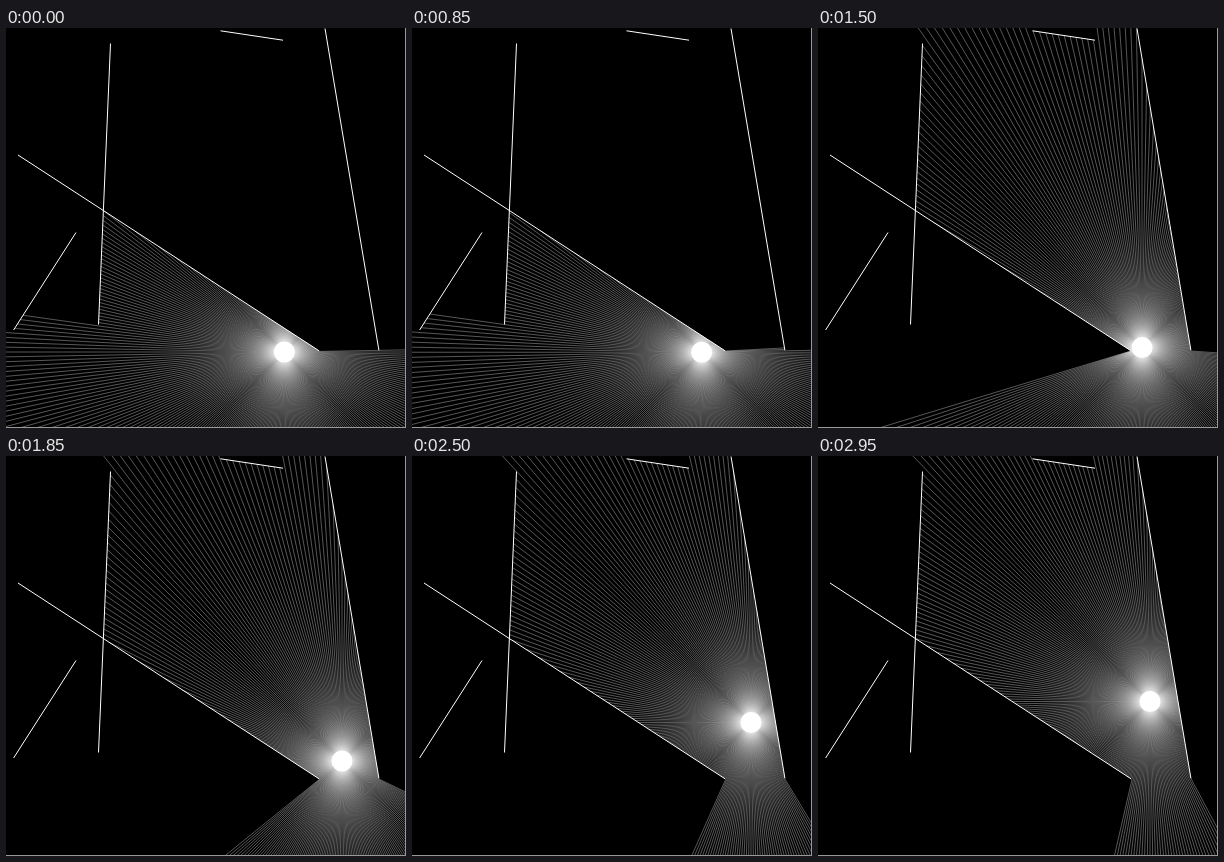
Animation, 400 px wide and 400 px high, one loop 3 s. Source, as an HTML page with a canvas:

```html
<!DOCTYPE html>
<html lang="en">
<head>
<meta charset="utf-8">
<title>Ray casting</title>
<style>
html, body { margin: 0; width: 100%; height: 100%; overflow: hidden; background: #000; }
canvas { display: block; width: 400px; height: 400px; }
</style>
</head>
<body>
<canvas id="stage" width="400" height="400"></canvas>
<script>
const SIZE = 400, LOOP = 3000;
const ctx = document.getElementById('stage').getContext('2d');

// x1, y1, x2, y2
const walls = [
  [12, 127, 313.2, 322.9],
  [104.5, 15.5, 92.5, 296.5],
  [70, 204.5, 7.6, 302],
  [214.5, 2.8, 277, 12.2],
  [319, 0.5, 372.9, 322.3]
];

// Key points of the light's path: step, x, y
const path = [
  [0, 278.3, 324], [7, 300, 323.8], [11, 324, 319.6],
  [15, 336, 305], [22, 339, 266.5], [27, 332, 245.5]
];

// The light rests, then steps about eleven times a second on a 50 ms clock
function stepAt(time) {
  if (time < 450) return 0;
  const clock = Math.floor(time / 50) * 50;
  return Math.max(1, Math.ceil((clock - 442.5) / 91.6) - 1);
}

function slope(i, axis) {
  const a = path[Math.max(i - 1, 0)];
  const b = path[Math.min(i + 1, path.length - 1)];
  return (b[axis] - a[axis]) / (b[0] - a[0]);
}

// Cubic Hermite curve through the key points
function along(step, axis) {
  let i = 0;
  while (i < path.length - 2 && step >= path[i + 1][0]) i++;
  const a = path[i], b = path[i + 1];
  const h = b[0] - a[0], u = (step - a[0]) / h, v = 1 - u;
  return a[axis] * v * v * (1 + 2 * u) + b[axis] * u * u * (3 - 2 * u) +
    h * u * v * (slope(i, axis) * v - slope(i + 1, axis) * u);
}

// Distance along the ray to a wall, or Infinity
function hit(x, y, dx, dy, [x1, y1, x2, y2]) {
  const ex = x2 - x1, ey = y2 - y1;
  const den = dx * ey - dy * ex;
  const px = x1 - x, py = y1 - y;
  const dist = (px * ey - py * ex) / den;
  const part = (px * dy - py * dx) / den;
  return dist > 0 && part >= 0 && part <= 1 ? dist : Infinity;
}

// Distance from p to the stage edge along one axis
function edge(p, d) {
  return d ? ((d > 0 ? SIZE : 0) - p) / d : Infinity;
}

function line(x1, y1, x2, y2) {
  ctx.beginPath();
  ctx.moveTo(x1, y1);
  ctx.lineTo(x2, y2);
  ctx.stroke();
}

function draw(time) {
  const step = stepAt(time);
  const x = along(step, 1), y = along(step, 2);

  ctx.fillStyle = '#000';
  ctx.fillRect(0, 0, SIZE, SIZE);
  ctx.strokeStyle = '#fff';
  for (const w of walls) line(...w);

  ctx.strokeStyle = 'rgba(255,255,255,0.34)';
  for (let deg = 0; deg < 360; deg++) {
    const a = deg * Math.PI / 180, dx = Math.cos(a), dy = Math.sin(a);
    const d = Math.min(edge(x, dx), edge(y, dy),
      ...walls.map(w => hit(x, y, dx, dy, w)));
    line(x, y, x + dx * d, y + dy * d);
  }

  ctx.fillStyle = '#fff';
  ctx.beginPath();
  ctx.arc(x, y, 10.5, 0, Math.PI * 2);
  ctx.fill();

  ctx.fillStyle = '#999';
  ctx.fillRect(SIZE - 1, 0, 1, SIZE);
  ctx.fillRect(0, SIZE - 1, SIZE, 1);
}

const start = performance.now();
function frame() {
  draw((performance.now() - start) % LOOP);
  requestAnimationFrame(frame);
}
frame();
</script>
</body>
</html>
```
